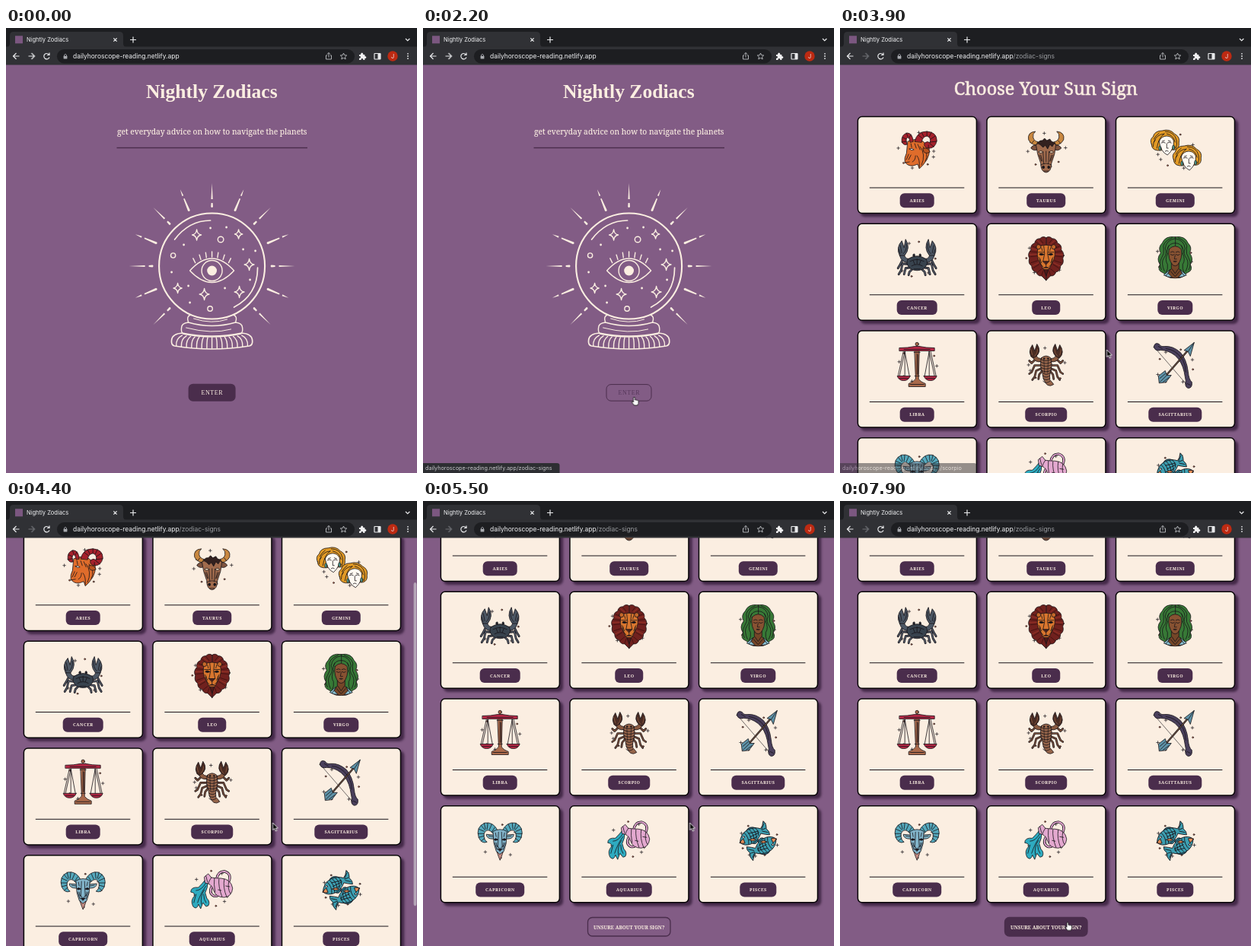
An HTML page for the animation above (8000 ms loop, 540x585 px).

```html
<!DOCTYPE html>
<html lang="en">
<head>
<meta charset="utf-8">
<title>Nightly Zodiacs</title>
<style>
@property --scroll { syntax: '<number>'; inherits: true; initial-value: 0; }
html, body { margin: 0; width: 100%; height: 100%; overflow: hidden; background: #825c85; }
svg { display: block; width: 540px; height: 585px; }
#stage { animation: scroll 8s linear infinite; }
text { font-family: "Noto Serif", serif; fill: #fbeee1; }
.ui { font-family: Inter, Roboto, sans-serif; fill: #f1f2f4; }
.mid { text-anchor: middle; }
.line { fill: none; stroke: #fbeee1; stroke-linecap: round; stroke-linejoin: round; }
.card { fill: #fbeee1; stroke: #070507; stroke-width: 1.5; filter: drop-shadow(4.5px 4.5px 1.5px #39203dd8); }
.art { stroke: #171319; stroke-width: .8; stroke-linejoin: round; stroke-linecap: round; }
.tag { font-weight: 600; font-size: 5.6px; letter-spacing: .5px; }
#list { transform: translateY(calc(var(--scroll) * -1px)); }
#thumb { transform: translateY(calc(var(--scroll) * .795px)); animation: thumb 8s linear infinite; }
.home { animation: home 8s step-end infinite; }
.signs { opacity: 0; animation: signs 8s step-end infinite; }
.solid { animation: solid 8s linear infinite; }
.hollow { opacity: 0; animation: hollow 8s linear infinite; }
#ask { animation: ask 8s linear infinite; }
#status { animation: status 8s linear infinite; }
#cursor { animation: move 8s ease-in-out infinite; }
#arrow { animation: arrow 8s step-end infinite; }
#hand { animation: hand 8s step-end infinite; }
@keyframes scroll {
  0%, 49.2% { --scroll: 0; }
  51% { --scroll: 17; }
  55% { --scroll: 73; }
  58% { --scroll: 121; }
  60% { --scroll: 140; }
  61.25% { --scroll: 141.5; }
  65%, 100% { --scroll: 138; }
}
@keyframes thumb { 0%, 49.2% { opacity: 0; } 50%, 64% { opacity: 1; } 67%, 100% { opacity: 0; } }
@keyframes home { 0% { opacity: 1; } 31.25%, 100% { opacity: 0; } }
@keyframes signs { 0% { opacity: 0; } 31.25%, 100% { opacity: 1; } }
@keyframes solid { 0%, 12% { opacity: 1; } 15%, 100% { opacity: 0; } }
@keyframes hollow { 0%, 12% { opacity: 0; } 15%, 100% { opacity: 1; } }
@keyframes ask { 0%, 78.5% { fill-opacity: 0; } 82%, 100% { fill-opacity: 1; } }
@keyframes status { 0%, 13.5% { opacity: 0; } 15%, 47.5% { opacity: 1; } 50%, 100% { opacity: 0; } }
@keyframes move {
  0%, 6% { transform: translate(326px, 466px); }
  12.5%, 41% { transform: translate(277.5px, 485px); }
  47%, 68.7% { transform: translate(350.5px, 423px); }
  74% { transform: translate(352px, 532px); }
  78.5%, 91.5% { transform: translate(275px, 565px); }
  98.5%, 100% { transform: translate(299px, 553.5px); }
}
@keyframes arrow { 0% { opacity: 0; } 5% { opacity: 1; } 11.5% { opacity: 0; } 43.5% { opacity: 1; } 77% { opacity: 0; } }
@keyframes hand { 0% { opacity: 0; } 11.5% { opacity: 1; } 43.5% { opacity: 0; } 77%, 100% { opacity: 1; } }
</style>
</head>
<body>
<svg id="stage" viewBox="0 0 540 585"></svg>
<script>
const CREAM = '#fbeee1', PLUM = '#4a2d4c', INK = '#171319';
const path = (d, fill = 'none', extra = '') => `<path d="${d}" fill="${fill}" ${extra}/>`;
const oval = (x, y, rx, ry, fill = 'none', extra = '') =>
  `<ellipse cx="${x}" cy="${y}" rx="${rx}" ry="${ry}" fill="${fill}" ${extra}/>`;
const rect = (x, y, w, h, r, fill, extra = '') =>
  `<rect x="${x}" y="${y}" width="${w}" height="${h}" rx="${r}" fill="${fill}" ${extra}/>`;
// Coloured line with an ink outline
const tube = (d, color, outer, inner) =>
  path(d, 'none', `stroke-width="${outer}"`) + path(d, 'none', `stroke="${color}" stroke-width="${inner}"`);
const at = (x, y, body, more = '') => `<g transform="translate(${x} ${y}) ${more}">${body}</g>`;
const both = body => body + `<g transform="scale(-1 1)">${body}</g>`;
const range = n => [...Array(n).keys()];
const star = (x, y, r) =>
  `M${x} ${y - r}Q${x + .8} ${y - .8} ${x + r * .85} ${y}Q${x + .8} ${y + .8} ${x} ${y + r}` +
  `Q${x - .8} ${y + .8} ${x - r * .85} ${y}Q${x - .8} ${y - .8} ${x} ${y - r}Z`;

const sparkles = seed => range(9).map(i => {
  const a = i * 2.4 + seed * 1.3, r = 22 + (i * 7 + seed * 5) % 5;
  const x = (Math.cos(a) * r).toFixed(1), y = (Math.sin(a) * r * .95).toFixed(1);
  return i % 2 ? oval(x, y, 1, 1, '#b5654a', 'stroke-width=".6"')
    : path(`M${x} ${y}m-1.800 0h3.600m-1.800-1.800v3.600`, 'none', 'stroke-width=".7"');
}).join('');

const twinFace =
  path('M-18 1Q-21-5-16-9Q-14-17-4-17Q6-20 12-13Q20-9 18-1Q19 6 13 8L-10 9Q-18 8-18 1Z', '#e29a25') +
  path('M-15-2Q-12-12-1-13Q-9-8-11 6M-16 4Q-16-2-13-5M0-16Q12-16 15-4Q16 1 14 6M2-13Q11-11 13-2M-8-14Q-13-10-15-6') +
  path('M-8-3Q-5-10 2-10Q8-10 11-4Q12 7 3 15Q-6 11-8-3Z', '#fffaf2') +
  path('M-5-1q3-2 5 0m3 0q3-2 5 0M2 0v6h2M0 10q2-2 4 0M-4-3l3-1M4-4l3 1') +
  oval(-7, 6, 1.5, 3, '#54a393') + oval(11, 5, 1.5, 3, '#54a393');

const fish =
  path('M-6-9Q0-15 8-8M-5 8Q0 14 5 7L3 4', '#287c91') +
  path('M-19 2Q-14-9-3-10Q7-10 13-5Q17-7 20-13Q23-7 20-2Q23 3 21 7Q15 4 11 1Q4 9-6 9Q-15 9-19 2Z', '#3d9fb1') +
  path('M-9-8Q-5 0-9 8M-5-9q4 9 0 17M-1-9q4 8 0 16M3-9q4 7 0 14M7-8q3 5 0 10M14-4l5-5M14-1l6 4M14-3h5M-4-5l13 2M-4 0L9-1M-4 4l9-1') +
  path('M-19 2Q-16-1-13-1L-13 5Q-17 5-19 2ZM-6 3Q-1 2 2 6Q-3 8-6 3Z', '#e28d57') + oval(-12, -3, 1.3, 1.3, '#fff');

const pan = path('M16-18L10 14M16-18L23 14M16-18V14M18-18L25 14', 'none', 'stroke-width=".8"') +
  path('M9 14H26Q24 20 17.500 20Q11 20 9 14Z', '#b32744') + path('M12 17H23');

const crabLegs = 'M9 4L18 0 22 8 25 13M9 8L19 7 21 16 24 21M8 12L15 13 17 21M6 14L10 18 11 22';
const stingLegs = 'M5-5L14-8 19-3 22-6M6 0L15 0 19 9 22 11M6 4L13 7 15 15 18 19M5 7L9 12 10 18';
const jugHandles = 'M6-14Q8-25 17-24Q26-21 22-11M0-5Q-5 4 2 8Q6 9 8 7';

const signs = {
  ARIES:
    path('M-12-13Q-2-18 8-13L16-4Q17 4 13 11L8 18 3 23 1 17-5 19Q-12 20-16 14Q-17 9-14 3Z', '#df6c2b') +
    path('M4-6Q12 4 6 18M8-6Q16 4 11 13M0 6Q4 11 3 21M-11 4L-14 11M-8 5L-11 11M-6 14Q-2 12-2 6M-16 15l6-1M-3-10L-1-4M-8-10L-7-5M1-9L4-2') +
    path('M-3-13Q0-26 13-26Q26-25 26-14Q24-3 14-4Q8-6 10-11Q14-14 17-11Q19-18 13-20Q7-19 6-12Z', '#a5212b') +
    path('M-5-13Q-6-24-13-24Q-21-22-20-12Q-17-7-13-9L-14-13Q-15-18-11-18Q-10-16-9-12Z', '#a5212b') +
    path('M2-21l5 4M6-25l3 6M13-26v6M19-25l-3 6M24-20l-6 4M26-13l-9 1M22-6l-5-4M15-4l0-4M-8-22l-2 4M-14-24l2 5M-19-18l5 2M-20-12l6-1') +
    path('M8-4Q15-5 17 1Q12 4 9 1Z', '#b9531f') + path('M-10-3Q-7-5-4-2Q-7 0-10-3Z', '#fff'),
  TAURUS:
    both(path('M5-11Q16-12 17-18Q18-23 14-26Q25-25 23-15Q19-7 7-7Z', '#c8873f') + path('M11-12l2 4M16-14l3 4') +
      path('M10-8Q18-9 20-4Q15 1 10-3Z', '#7e5440')) +
    path('M-13-9Q0-16 13-9L11 4 7 16Q7 27 0 28Q-7 27-7 16L-11 4Z', '#a06b4d') +
    path('M-11-11Q-8-15-5-14L-2-17 1-14 5-16 7-13 11-11 8-6 5-9 2-3-1-8-4-5-7-8Z', '#33211f') +
    path('M-4 1L-3 17M4 1L3 17M0 0V14M-7 18Q0 14 7 18M-3 26h6M-9 5L-6 13M9 5L6 13M-7 5L-5 13M7 5L5 13') +
    both(path('M4 1Q7-2 10 1Q7 4 4 1Z', '#e4c6a8') + oval(3.5, 21, 1.4, 1.7, INK)),
  GEMINI: at(-13, -10, twinFace) + at(16, 10, twinFace),
  CANCER:
    both(tube(crabLegs, '#5c6674', 2.8, 1.2) +
      path('M7 0Q15 3 17-5L23-4Q20 7 9 6Z', '#4c5764') +
      path('M16-4Q8-14 15-25Q16-20 17-14L20-23Q28-14 23-4Z', '#4c5764') +
      path('M14-19Q13-11 18-6M22-17L20-7M24-12L22-6')) +
    path('M-12 1Q0-7 12 1Q16 8 8 14Q0 18-8 14Q-16 8-12 1Z', '#38434e') +
    path('M-9 4Q0-1 9 4M-7 10Q0 6 7 10M-4 14h8M-5 3L-3 8M5 3L3 8M0 1V7') + both(oval(4, -4, 1.2, 1.8, '#20262d')),
  LEO:
    both(path('M0-27Q4-30 8-26Q14-26 15-20Q21-18 20-11Q25-6 22 0Q24 7 19 10Q19 17 13 18Q11 24 6 23L0 29Z', '#70211e') +
      path('M4-20L8-25M8-17L14-22M11-13L18-16M12-8L21-9M12-3L21-2M11 3L20 6M9 8L17 13M6 14L12 19M4 17L6 23', 'none', 'stroke="#3b100f"') +
      path('M6-19L11-23M12-11L20-13M12-5L22-5M10 6L18 10', 'none', 'stroke="#a63a2a"')) +
    path('M-10-15Q0-20 10-15Q14-4 8 6L4 14Q0 18-4 14L-8 6Q-14-4-10-15Z', '#d9762e') +
    both(oval(10, -15, 3, 3, '#c5672a') + path('M3-5Q7-8 9-5Q6-3 3-5Z', INK) +
      path('M3-16L2-6 4 4M6-14L5-10M3-8L10-8M4 11Q9 7 8 1M9-1L6 6')) +
    path('M-4 4H4L0 8ZM0 8V12M-4 13Q0 10 4 13', '#4a211c') + path('M-3 15L0 23 3 15Z', '#4f1917'),
  VIRGO:
    both(path('M0-28Q13-30 17-20Q23-14 19-7Q25 1 20 8Q24 16 16 19Q12 23 7 18L0 10Z', '#377936') +
      path('M0-26Q12-24 13-13Q10-6 15 0Q19 6 14 17M4-27Q18-21 15-12Q14-6 18 0Q22 7 18 15M10-6Q14 2 10 8Q9 14 12 19M8-17Q12-10 10-6M0-20Q8-20 10-13')) +
    path('M-5 6V14L-14 22Q-7 27 0 26Q7 27 14 22L5 14V6Z', '#744628') +
    path('M-8-12Q0-20 8-12Q10 1 3 9Q0 11-3 9Q-10 1-8-12Z', '#875232') +
    path('M-6-5q3 2 5 0M1-5q3 2 5 0M-6-8q3-2 5 0M1-8q3-2 5 0M0-4L-1 1H2M-2 4Q0 3 2 4Q0 6-2 4') +
    both(path('M7 15L15 22Q10 25 4 25L9 20Z', '#8bc2d2') + path('M8 18l4 5')) + path('M-4 14L0 20 4 14M-6 17L0 24 6 17'),
  LIBRA:
    both(pan) + path('M-3-19H3L2 18Q5 22 11 24V28H-11V24Q-5 22-2 18Z', '#a9694a') +
    path('M-23-23Q-12-23-3-25H3Q12-23 23-23V-19H-23Z', '#b32744') + oval(0, -28, 2.2, 2.2, '#a9694a') +
    path('M-4-17H4M-3 14H3M-9 25H9M0-15V12M1-14V12M-17-21h34'),
  SCORPIO:
    both(tube(stingLegs, '#8a5a40', 2.700, 1.1) +
      path('M4-9Q12-8 13-14L18-12Q15-3 6-5Z', '#8a5a40') +
      path('M14-11Q5-18 12-28L15-19 18-27Q25-17 18-10Z', '#4a2c23') + path('M11-21Q11-16 15-12M20-21L18-14', 'none', 'stroke="#8a5a40"')) +
    path('M-6-10Q0-15 6-10Q9-1 6 8Q4 14 5 19Q8 22 10 25Q6 28 2 26Q-4 21-5 9Q-9-1-6-10Z', '#96654a') +
    range(9).map(i => path(`M${i < 5 ? -7 : -4} ${i * 3.6 - 8}Q0 ${i * 3.6 - 4} ${i < 5 ? 7 : 5} ${i * 3.6 - 8}`)).join('') +
    path('M-3-8L-2 10M3-8L2 10', 'none', 'stroke-width=".6"') + both(oval(2.5, -9, .8, .8, INK)),
  SAGITTARIUS:
    path('M-28-24Q-27-31-21-28Q-19-24-14-25Q-3-26 7-17Q15-8 17 8Q18 19 22 22Q23 30 17 30Q12 28 14 20Q13 15 12 9Q9-5 0-13Q-9-20-19-20Q-26-18-28-24Z', '#4a405c') +
    path('M-24-20L15 25', 'none', 'stroke-width=".6"') + tube('M-16 18L18-21', '#a97a55', 2.4, .8) +
    path('M12-20L25-30 20-12 17-18Z', '#5e93a8') +
    path('M-21 23L-22 14-13 7-11 13-5 13-12 22Z', '#5e93a8') +
    path('M-20 22L-11 13M-20 17L-13 11M-16 22L-8 16M25-30L17-18M-12-22Q0-21 8-10M10-8Q14 0 14 9M-22-25l5 3M16 24l4 2'),
  CAPRICORN:
    both(path('M3-13Q9-25 20-23Q32-18 28-4Q24 5 17 2Q22-1 21-9Q18-16 12-12L7-7Z', '#55a9bd') +
      path('M7-17l4 6M11-21l3 7M16-23l1 8M21-23l-2 8M25-20l-5 6M28-15l-7 3M29-9l-8 0M28-4l-7-2M25 1l-5-4') +
      path('M7-7L18-8Q18-2 9-2Z', '#83b6c8') + path('M9-5l6-1')) +
    path('M-9-12Q0-17 9-12L8 4 5 14 0 20-5 14-8 4Z', '#82b4ca') + path('M-4 15L-2 21 0 26 2 21 4 15 0 18Z', '#c78e84') +
    both(path('M3-1Q6-4 8-1Q6 1 3-1Z', INK) + path('M2-11L3 9M6-10L5-5M1 10L4 7M7 3L4 12M5 3L4 8')) + path('M-3 11H3L0 14Z', INK),
  AQUARIUS:
    path('M-8-14Q-13-8-18-3Q-28-4-28 3Q-22 4-23 8Q-29 14-25 22Q-20 27-18 19L-15 25-12 17-8 22-5 21Q-2 16-7 11L-9 4Q-5-4-6-10Z', '#2eabc0') +
    path('M-8-9Q-14 1-21 1M-8-5Q-15 4-19 17M-10 0Q-16 8-14 19M-11 6Q-11 13-8 17M-21 6L-24 17') +
    tube(jugHandles, '#dda1cb', 3.4, 1.9) +
    path('M-10-17L-5-21-1-16Q6-15 12-15Q25-14 27-2Q26 9 16 10Q5 10 2 1Q0-6-5-8L-9-9Z', '#e3a8cf') +
    path('M-1-16Q-4-12-5-8M3-15Q2-7 4 3M9-14Q8-4 13 9M16-14Q14-3 19 9M22-11Q20-2 24 5M-8-18L-6-10M18-5l5 1M8 0l4 1'),
  PISCES: at(-7, -6, fish, 'rotate(-22)') + at(7, 7, fish, 'rotate(158)')
};
const tagWidths = [45, 51, 51, 53, 37, 46, 45, 55, 70, 64, 60, 48];

const card = ([name, art], i) => {
  const w = tagWidths[i];
  return at(22.8 + i % 3 * 169.55, 116 + Math.floor(i / 3) * 140.75,
    `<rect class="card" x=".6" y=".6" width="156" height="127" rx="5.500"/>` +
    `<g class="art">${at(78.4, 46, sparkles(i) + art)}</g>` +
    path('M16 94H140.500', 'none', `stroke="${INK}"`) +
    rect(78.4 - w / 2, 101.2, w, 19, 6, PLUM) +
    `<text class="tag mid" x="78.600" y="112.800">${name}</text>`);
};

const rays = range(13).map(i => {
  const wedge = i % 2
    ? 'M0-109L1-100H-1ZM-.8-96H.8L1.500-79Q0-77-1.500-79Z'
    : 'M0-109L1.100-88H-1.100ZM-1-83H1L1.400-78Q0-76-1.400-78Z';
  return path(wedge, CREAM, `transform="rotate(${i * 22.5 - 135})"`);
}).join('');

const dots = [[-2, -50], [19, -51], [-37, -28], [41, -22], [57, -20], [-53, 8], [50, 18], [-31, 26], [-29, 48], [17, 29]];
const stars = [[-20, -41, 7], [35, -42, 6], [49, -2, 7.5], [36, 34, 7.5], [-10, 37, 7.5], [-45, 29, 6.5]];
const lashes = range(7).map(i => {
  const k = i - 3, x = k * 7.3, y = -12 + k * k * .85;
  return `M${x} ${y}L${x * 1.13} ${y - 7 + Math.abs(k) * .4}`;
}).join('');

const ball = at(270.6, 313, rays + `<g class="line" stroke-width="1.400">` +
  oval(0, 0, 69.5, 69.5, 'none', 'stroke-width="2.100"') +
  path('M-49-35Q-30-60-2-60M60 2Q60 38 29 54', 'none', 'stroke-width="1.700"') +
  path('M-29 6Q0-26 29 6Q0 37-29 6Z') + oval(0, 6, 13.5, 13.5) + path(lashes) +
  stars.map(s => path(star(...s))).join('') +
  oval(11.5, -35, 3.8, 3.8) + oval(-51, -14, 3.1, 3.1) + oval(-2.5, 56, 3.2, 3.2) +
  path('M-28 64Q-34 66-31 74Q0 83 31 74Q34 66 28 64M-31 74Q-40 75-40 81Q-41 86-38 89Q0 97 38 89Q41 86 40 81Q40 75 31 74') +
  path('M-24 69Q0 77 20 70M-34 81Q0 90 25 83', 'none', 'stroke-width="1"') +
  path('M-39 88Q-52 89-53 97Q-54 104-49 105Q0 113 49 105Q54 104 53 97Q52 89 39 88M-39 88Q0 96 39 88', 'none', 'stroke-width="1.700"') +
  path(range(15).map(i => {
    const k = i - 7, y = 94 - k * k * .06;
    return `M${k * 5.6} ${y}Q${k * 6.8} ${y + 4} ${k * 6.7} ${y + 14}`;
  }).join('')) + '</g>' +
  oval(0, 6, 6.4, 6.4, CREAM) + dots.map(([x, y]) => oval(x, y, 1.4, 1.4, CREAM)).join(''));

const enter = (cls, box, color) =>
  `<g class="${cls}">${box}<text class="mid" x="270.800" y="482.300" style="font:8px 'Liberation Serif',serif;letter-spacing:.6px;fill:${color}">ENTER</text></g>`;

const home = `<g class="home">
  <text class="mid" x="270.300" y="92" style="font:bold 25.6px 'Liberation Serif',serif">Nightly Zodiacs</text>
  <text class="mid" x="270.700" y="140" font-size="10.250" stroke="${CREAM}" stroke-width=".12">get everyday advice on how to navigate the planets</text>
  ${rect(145.5, 156.8, 250.5, 1.4, 0, PLUM)}${ball}
  ${enter('solid', rect(239.6, 467.8, 62, 23, 6, PLUM), CREAM)}
  ${enter('hollow', rect(241, 468.6, 59, 21.6, 6, 'none', `stroke="${PLUM}"`), '#57375b')}
</g>`;

const list = `<g class="signs"><g id="list">
  <text class="mid" x="270.500" y="88" font-size="23.500" stroke="${CREAM}" stroke-width=".6">Choose Your Sun Sign</text>
  ${Object.entries(signs).map(card).join('')}
  ${rect(216.5, 685.5, 108.5, 24.5, 6, PLUM, `id="ask" stroke="${PLUM}" stroke-width="1.300"`)}
  <text class="mid" x="270.700" y="700.500" font-size="6.400" font-weight="700">UNSURE ABOUT YOUR SIGN?</text>
  </g>${rect(535.6, 49, 3.8, 425, 1.9, '#b6a6b8', 'id="thumb"')}</g>`;

const host = 'dailyhoroscope-reading.netlify.app';
const arrowIcon = 'M4 0H-4M0-4L-4 0 0 4';
const chrome = rect(0, 0, 540, 25, 0, '#1d1e21') +
  path('M1 25Q5 25 5 20V10Q5 5 10 5H149Q154 5 154 10V20Q154 25 158 25Z', '#303135') +
  rect(0, 24.5, 540, 24, 0, '#303135') + rect(67, 28, 391, 18.5, 9.2, '#1d1e21') +
  rect(12, 10.3, 10, 10, 0, '#7b5780') +
  `<text class="ui" x="27" y="18" font-size="7.500">Nightly Zodiacs</text>
  <text class="ui" x="88" y="40.200" font-size="8.450">${host}<tspan class="signs" style="fill:#999b9f">/zodiac-signs</tspan></text>
  <g fill="none" stroke="#e8e9eb" stroke-width="1.200">` +
  path('M141.300 13.300l4.400 4.400m0-4.400l-4.400 4.400M163 15.500h8m-4-4v8M525 14l2.700 2.700 2.700-2.700') +
  at(13.5, 37, path(arrowIcon)) +
  `<g class="home">${at(33.5, 37, path(arrowIcon), 'scale(-1 1)')}</g>` +
  `<g class="signs" stroke="#707277">${at(33.5, 37, path(arrowIcon), 'scale(-1 1)')}</g>` +
  path('M56.500 35A3.700 3.700 0 1 0 57 38.500M57 32.500V35.500H54') +
  path('M76.500 37V35.500Q78 33 79.500 35.500V37', 'none', 'stroke="#a9abb0" stroke-width=".9"') +
  path('M422 36h-1.500v5h7v-5H426M424 38.500v-6m-2 2l2-2 2 2', 'none', 'stroke="#bfc1c5" stroke-width=".9"') +
  path('M443.500 33l1.200 2.700 3 .3-2.200 2 .7 3-2.700-1.600-2.700 1.600.7-3-2.200-2 3-.3Z', 'none', 'stroke="#bfc1c5" stroke-width=".9"') +
  rect(484, 33.5, 8, 7.5, .5, 'none') + '</g>' +
  rect(75.6, 36.8, 4.8, 3.8, .5, '#a9abb0') + rect(488.5, 33.5, 3.5, 7.5, 0, '#e8e9eb') +
  path('M464 35h2q0-2.500 1.700-2.500t1.700 2.500h2v2q2 0 2 1.500t-2 1.500v2h-2q0-2-1.500-2t-1.500 2H464v-2.300q2 0 2-1.500t-2-1.200Z', '#f1f1f2') +
  oval(508, 37, 6.7, 6.7, '#bd2a12') +
  `<text class="ui mid" x="508" y="39.600" font-size="7.300">J</text>` +
  [-3.2, 0, 3.2].map(d => oval(528, 37 + d, .9, .9, '#e8e9eb')).join('');

const status = `<g id="status">${path('M0 572H176Q179.500 572 179.500 575V585H0Z', '#2d2e32')}
  <text class="ui home" x="3" y="581.200" font-size="7.250" style="fill:#c6c7ca">${host}/zodiac-signs</text>
  <text class="ui signs" x="3" y="581.200" font-size="7.250" style="fill:#c6c7ca">${host}/.../scorpio</text></g>`;

const cursor = `<g id="cursor" stroke-linejoin="round">
  ${path('M0 0V9.500L2.200 7.500 3.800 11 5.400 10.300 3.900 7H6.800Z', '#0b0b0b', 'id="arrow" stroke="#fff" stroke-width=".8"')}
  ${path('M-1 .8Q0-.5 1 .8V4Q2 3.300 2.600 4.300Q3.600 3.700 4.200 4.700Q5.600 4.300 5.700 5.700Q5.900 9 4.300 11H-.1L-3 7Q-3.300 5.600-2 5.900L-1 6.900Z', '#fff', 'id="hand" stroke="#111" stroke-width=".8"')}
</g>`;

document.getElementById('stage').innerHTML =
  rect(0, 0, 540, 585, 0, '#825c85') + home + list + chrome + status + cursor;
</script>
</body>
</html>
```
